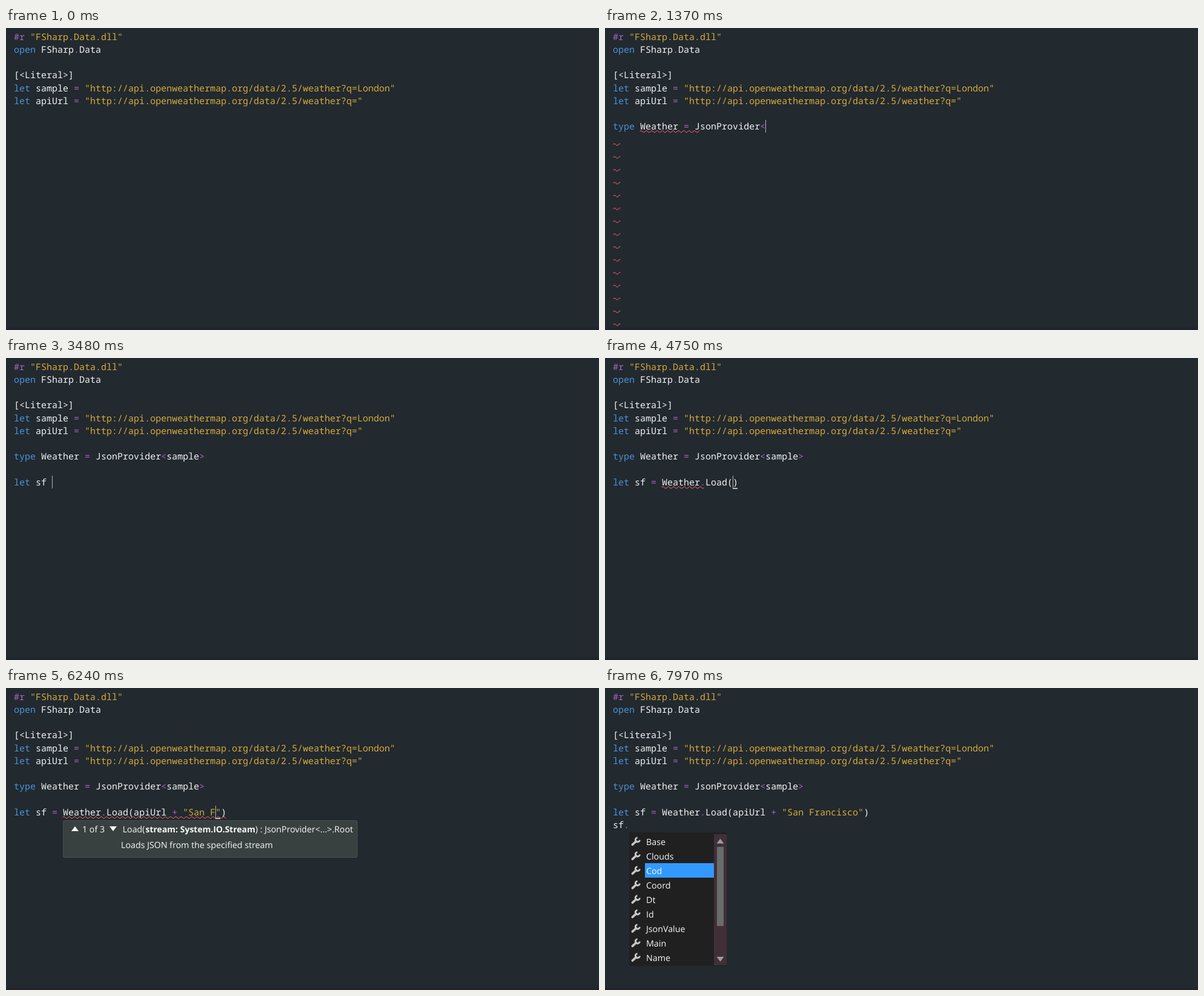
An HTML page that plays this animation: 980 by 500 pixels, repeating every 8000 ms.

```html
<!DOCTYPE html>
<html lang="en">
<head>
<meta charset="utf-8">
<title>Typed weather data</title>
<style>
html, body { margin: 0; width: 100%; height: 100%; overflow: hidden; background: #22292f; }
svg { display: block; width: 980px; height: 500px; }
text { white-space: pre; text-rendering: geometricPrecision; fill: #f1f2f3; }
.code text { font: 15.02px "Noto Sans Mono", "DejaVu Sans Mono", monospace; }
.ui text { font: 14.25px "Open Sans", "Noto Sans", sans-serif; fill: #f8f8f8; }
.ui .row { font-size: 14px; }
.ui .b { font-weight: 700; }
.key { fill: #4a92d6; }
.op { fill: #a566bd; }
.str { fill: #d6aa38; }
.wave { fill: none; stroke: #c4575a; stroke-width: 1.1; }
.panel { fill: #394140; stroke: #474f4e; }
</style>
</head>
<body>
<svg viewBox="0 0 980 500">
  <rect width="980" height="500" fill="#22292f"/>
  <rect y="496" width="980" height="4" fill="#1f252a"/>
  <g id="code" class="code"></g>
  <g id="ui" class="ui"></g>
</svg>
<script>
const LOOP = 8000, LEFT = 12.5, PITCH = 9.01;
const codeLayer = document.getElementById('code');
const uiLayer = document.getElementById('ui');

const START = `#r "FSharp.Data.dll"
open FSharp.Data

[<Literal>]
let sample = "http://api.openweathermap.org/data/2.5/weather?q=London"
let apiUrl = "http://api.openweathermap.org/data/2.5/weather?q="

`;

// [time of first key, time of last key, keys]
const KEYS = [
  [107, 825, 'type Weather = J'],
  [890, 1290, 'sonProvider'], [1335, 1335, '<'],
  [1630, 1780, 'sam'], [2150, 2440, 'ple'],
  [2840, 2840, '>'], [2960, 3020, '\n\n'],
  [3100, 3480, 'let sf '], [3555, 3630, '= '],
  [3660, 4160, 'Weather.'], [4530, 4680, 'Load'], [4750, 4750, '('],
  [5070, 5790, 'apiUrl + '],
  [5890, 6240, '"San F'], [6340, 6600, 'rancisco'],
  [6640, 6640, '"'], [6700, 6700, ')'], [6800, 6800, '\n'],
  [7000, 7260, 'sf.']
];

const within = (t, a, b) => t >= a && t < b;
const colX = n => LEFT + PITCH * n;
const baseline = row => Math.floor(20 + 21.25 * row);
const esc = s => s.replace(/&/g, '&amp;').replace(/</g, '&lt;').replace(/>/g, '&gt;');
const label = (x, y, s, cls = '') => `<text x="${x}" y="${y}" class="${cls}">${esc(s)}</text>`;
const box = (x, y, w, h, fill) => `<rect x="${x}" y="${y}" width="${w}" height="${h}" fill="${fill}"/>`;
const panel = (x, y, w, h) =>
  `<rect class="panel" x="${x + .5}" y="${y + .5}" width="${w - 1}" height="${h - 1}" rx="1.5"/>`;
const tri = (x, y, dir, fill) =>
  `<path d="M${x - 6} ${y + 4 * dir}h12l-6 ${-8 * dir}z" fill="${fill}"/>`;

function typed(t) {
  let s = '';
  for (const [a, b, keys] of KEYS) {
    if (t < a) break;
    const gap = (b - a) / Math.max(1, keys.length - 1);
    s += keys.slice(0, gap ? Math.floor((t - a) / gap + 1e-6) + 1 : 1);
  }
  return s;
}

function paint(line) {
  if (line[0] === '[') return esc(line);
  const token = /("[^"]*"?)|(\b(?:let|type|open)\b)|(#r|[=+.<>])|[^"#=+.<>\s]+|\s+|./g;
  return line.replace(token, (s, str, key, op) => {
    const cls = str ? 'str' : key ? 'key' : op ? 'op' : '';
    return cls ? `<tspan class="${cls}">${esc(s)}</tspan>` : esc(s);
  });
}

function wave(x1, x2, y) {
  let d = '';
  for (let x = x1; x <= x2; x++) {
    const dy = -1.5 * Math.sin((x - x1) * Math.PI / 4.4);
    d += `${d ? 'L' : 'M'}${x.toFixed(1)} ${(y + dy).toFixed(2)}`;
  }
  return `<path class="wave" d="${d}"/>`;
}

const underline = (row, from, to) => wave(colX(from), colX(to), baseline(row) + 3.4);

function drawCode(t) {
  const head = START + typed(t);
  const tail = within(t, 5890, 6640) ? '")' : within(t, 4750, 6700) ? ')' : '';
  const lines = (head + tail).split('\n');
  const before = head.split('\n');
  const row = before.length - 1, col = before[row].length;
  let out = '';

  if (within(t, 860, 1850)) {
    out += underline(7, 5, 16);
    for (let i = 0; i < 15; i++) out += wave(13.5, 26, 193 + 21.3 * i);
  }
  if (within(t, 1850, 2900)) out += underline(7, 15, 27);
  if (within(t, 4710, 5430)) out += underline(9, 9, 16.8);
  if (within(t, 5430, 6900)) out += underline(9, 9, lines[9].length);

  lines.forEach((s, i) => {
    if (s) out += `<text x="12.9" y="${baseline(i)}">${paint(s)}</text>`;
  });
  const cx = Math.round(colX(col));
  if (tail) out += box(cx, baseline(row) + 4, 8, 2, '#b4bcbc');
  if (within(t, 60, 7640)) out += box(cx, baseline(row) - 16, 1, 21, '#b4b6b6');
  return out;
}

function typeHelp() {
  const notes = [
    [218, 'Typed representation of a JSON document.'],
    [258, 'Sample: Location of a JSON sample file or a string containing a sample JSON document.'],
    [278, 'SampleIsList: If true, sample should be a list of individual samples for the inference.'],
    [298, 'RootName: The name to be used to the root type. Defaults to `Root`.'],
    [318, 'Culture: The culture used for parsing numbers and dates.'],
    [338, 'ResolutionFolder: A directory that is used when resolving relative file references (at design time and in hosted execution).']
  ];
  return panel(148, 176, 813, 178) +
    label(158.8, 194, 'JsonProvider<') + label(251, 194, 'Sample: string', 'b') +
    label(352, 194, ', ?SampleIsList: bool, ?RootName: string, ?Culture: string, ?ResolutionFolder: string>') +
    notes.map(([y, s]) => label(156, y, s)).join('');
}

function loadHelp() {
  return panel(94, 219, 487, 62) +
    tri(114, 233, 1, '#f8f8f8') + tri(177, 233, -1, '#f8f8f8') +
    label(126, 239, '1 of 3') + label(192.7, 239, 'Load(') +
    label(230.5, 239, 'stream: System.IO.Stream', 'b row') +
    label(412, 239, ') : JsonProvider<...>.Root') +
    label(190, 265, 'Loads JSON from the specified stream');
}

const wrench = (x, y) =>
  `<g transform="translate(${x} ${y})" fill="none" stroke="#c6c8c8">
  <path d="M2.3 17.3L8.6 11.6" stroke-width="3.6" stroke-linecap="round"/>
  <path d="M10.6 5.8A3.6 3.6 0 1 0 14.4 9.6" stroke-width="2.8"/></g>`;

// Rows are 24 px high; `right` is where the highlight ends.
function list(x, y, right, items, chosen) {
  return items.map((s, i) => {
    const top = y + 24 * i;
    return (i === chosen ? box(x + 26, top, right - x - 26, 24, '#3399ff') : '') +
      wrench(x + 3, top) + label(x + 28, top + 17.5, s);
  }).join('');
}

function rootMembers(t) {
  const items = ['Base', 'Clouds', 'Cod', 'Coord', 'Dt', 'Id', 'JsonValue', 'Main', 'Name'];
  const chosen = t < 7890 ? 0 : t < 7970 ? 1 : 2;
  let out = box(40, 239, 161, 221, '#202020') + box(180, 242, 21, 217, '#412f37') +
    box(185, 263, 11, 131, '#676d6b') + tri(190.5, 253.5, 1, '#9a9c9c') +
    tri(190.5, 449, -1, '#9a9c9c') + list(40, 242, 180, items, chosen);
  if (within(t, 7640, 7890)) {
    out += panel(202, 240, 296, 27) + label(208, 258.5, 'property JsonProvider<...>.Root.Base: string', 'row');
  }
  return out;
}

function drawUi(t) {
  if (within(t, 1400, 2840)) return typeHelp();
  if (within(t, 4230, 4750)) {
    return box(166, 218, 207, 50, '#202020') + list(166, 219, 372, ['AsyncLoad', 'Load'], t < 4530 ? 0 : 1);
  }
  if (within(t, 4840, 6700)) return loadHelp();
  return t >= 7410 ? rootMembers(t) : '';
}

function update(layer, html) {
  if (layer.shown === html) return;
  layer.shown = html;
  layer.innerHTML = html;
}

const begin = performance.now();
function frame() {
  const t = (performance.now() - begin) % LOOP;
  update(codeLayer, drawCode(t));
  update(uiLayer, drawUi(t));
  requestAnimationFrame(frame);
}
frame();
</script>
</body>
</html>
```
